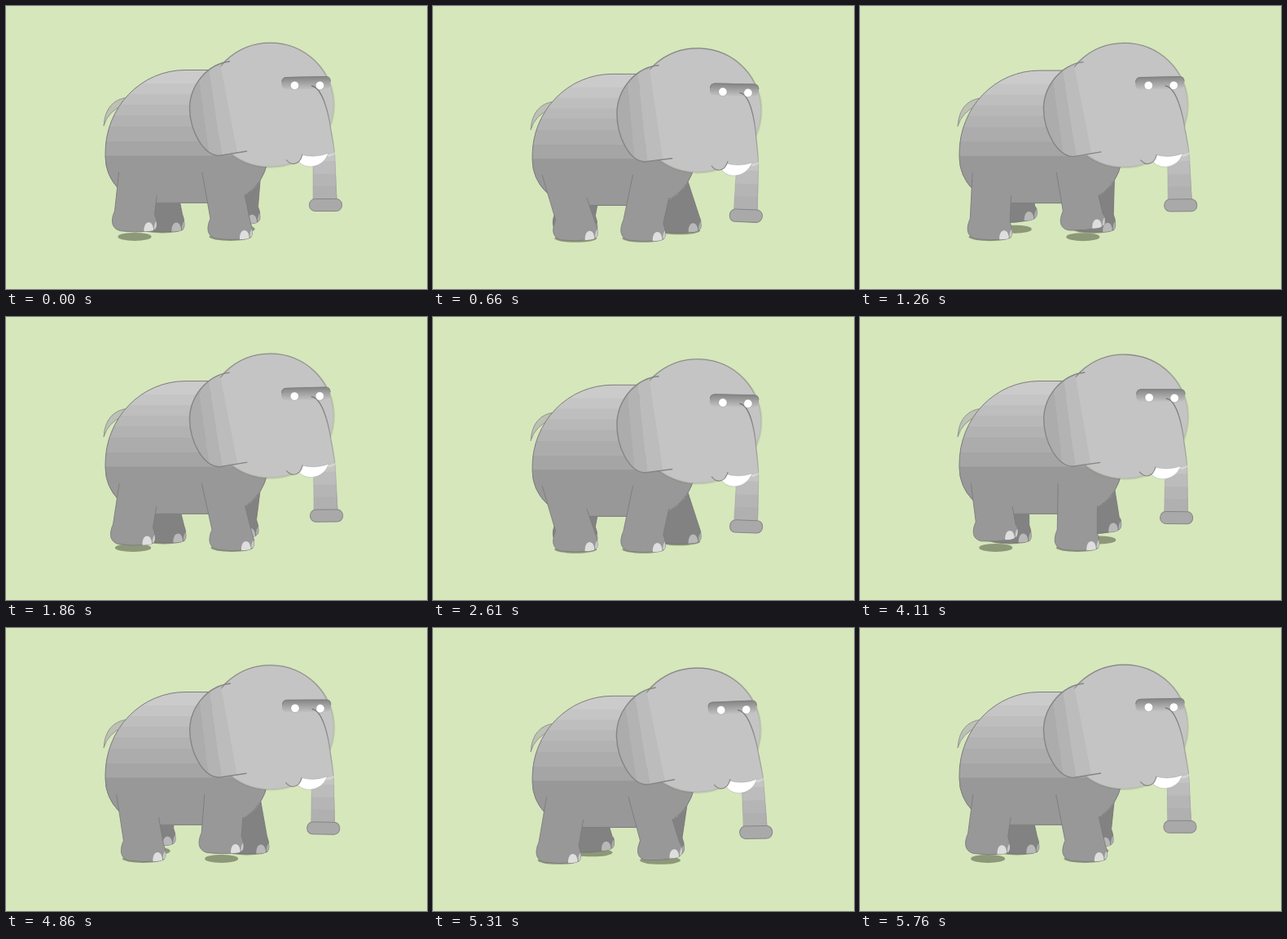
Recreate the animation shown at these times as an HTML page with a canvas. Size 517x347 px, loop 5910 ms.

```html
<!DOCTYPE html>
<html lang="en">
<head>
<meta charset="utf-8">
<title>Walking elephant</title>
<style>
  html, body { margin: 0; width: 100%; height: 100%; overflow: hidden; background: #d6e7bc; }
  canvas { display: block; width: 517px; height: 347px; }
</style>
</head>
<body>
<canvas id="stage" width="517" height="347"></canvas>
<script>
const ctx = document.getElementById('stage').getContext('2d');
const LOOP = 5910, STRIDE = 1930, TAU = Math.PI * 2, DEG = Math.PI / 180;
const SKIN = '#c4c4c4', HIDE = '#989898', FAR = '#828282', LINE = '#7c7c7c';

const gray = v => `rgb(${v},${v},${v})`;
const smooth = x => { x = Math.min(1, Math.max(0, x)); return x * x * (3 - 2 * x); };
const wave = u => Math.cos(TAU * u);
// 1 at whole turns, -1 half way between, straight in between
const triangle = u => 1 - 4 * Math.abs(u - Math.round(u));

function paint(path, fill, stroke, width = 1) {
  if (fill) { ctx.fillStyle = fill; ctx.fill(path); }
  if (stroke) { ctx.strokeStyle = stroke; ctx.lineWidth = width; ctx.stroke(path); }
}

function ellipse(x, y, rx, ry, fill, stroke, width) {
  const p = new Path2D();
  p.ellipse(x, y, rx, ry, 0, 0, TAU);
  paint(p, fill, stroke, width);
}

function clipped(path, draw) {
  ctx.save();
  ctx.clip(path);
  draw();
  ctx.restore();
}

function group(x, y, { turn = 0, lean = 0, stretch = 1 }, draw) {
  ctx.save();
  ctx.translate(x, y);
  ctx.rotate(turn * DEG);
  ctx.transform(1, 0, -Math.tan(lean * DEG), stretch, 0, 0);
  ctx.translate(-x, -y);
  draw();
  ctx.restore();
}

function poseAt(time) {
  const u = time / STRIDE;
  return {
    u,
    nod: triangle(u - 0.305) - triangle(-0.305),
    bob: 4.9 * smooth((wave(2 * (u - 0.3)) + 0.6) / 1.5)
  };
}

// rest: left side of the foot when the leg hangs straight; u: place in its own stride
function makeLeg(rest, u, far, bob) {
  const swing = wave(u - 0.34) * 11.2;
  const speed = -Math.sin(TAU * (u - 0.34));
  return {
    rest, far, swing,
    left: rest + swing,
    lift: smooth((speed - 0.4) / 0.48),
    tilt: 5.5 * Math.max(0, wave(u - 0.2)) ** 3,
    ground: (far ? 277.2 : 286.7) + bob * 0.4
  };
}

function drawShadow(leg) {
  ellipse(leg.left + 27.5, leg.ground - 3.8, 26 - leg.lift * 5.5, 5, 'rgba(70,75,55,.5)');
}

function toe(x, y, w, fill) {
  const p = new Path2D();
  p.moveTo(x, y);
  p.bezierCurveTo(x - 1, y - 15, x + w + 1, y - 15, x + w, y);
  paint(p, fill);
}

function drawLeg(leg, bob) {
  const { left: l, rest, swing, far } = leg;
  const bottom = leg.ground - leg.lift * 9.6;
  const sole = x => bottom - leg.tilt * x / 54;
  const top = 204 + bob * 0.6;
  const p = new Path2D();
  p.moveTo(rest + 0.5 - swing * 0.27, top);
  p.lineTo(l + 3, bottom - 26);
  p.bezierCurveTo(l - 1, bottom - 17, l - 3, bottom - 5, l + 10, sole(10) - 1.5);
  p.quadraticCurveTo(l + 27, sole(27) + 1, l + 46, sole(46) - 1);
  p.quadraticCurveTo(l + 55, sole(55) - 2, l + 54.5, sole(55) - 9);
  p.quadraticCurveTo(l + 54.5, sole(55) - 16, l + 52, bottom - 22);
  if (far) p.lineTo(rest + 48.5 - swing * 0.15, top);
  else p.lineTo(rest + 50 + swing * 0.2, 232 + bob * 0.6);
  paint(p, far ? FAR : HIDE, far ? '#777' : LINE, 0.9);
  clipped(p, () => {
    toe(l + 39, sole(45) - 0.5, 11.5, far ? '#b8b8b8' : '#dedede');
    toe(l + 51.5, sole(55) - 3, 10, far ? '#acacac' : '#cbcbcb');
  });
}

function drawTail() {
  paint(new Path2D('M150 112Q122 115 120 147Q125 129 145 121'), '#bcc1b4', '#92958d', 1);
}

function drawBody() {
  const p = new Path2D();
  p.ellipse(220, 180, 98, 101.5, 0, Math.PI, Math.PI * 1.5);
  p.lineTo(262, 78.5);
  p.ellipse(262, 180, 60, 101.5, 0, -Math.PI / 2, 0);
  p.ellipse(262, 180, 60, 61.3, 0, 0, Math.PI / 2);
  p.ellipse(180, 185, 58, 56.3, 0, Math.PI / 2, Math.PI);
  p.closePath();
  clipped(p, () => {
    [78, 95, 108, 121, 134, 148, 166, 183.5].forEach((y, i) => {
      ctx.fillStyle = i < 7 ? gray(Math.round(203 - i * 6.3)) : HIDE;
      ctx.fillRect(115, y, 215, 180);
    });
  });
  paint(p, null, LINE, 1);
}

function drawSkull() {
  ellipse(324.5, 121.5, 78, 76, SKIN, 'rgba(110,120,90,.2)', 3);
  const edge = ctx.createLinearGradient(340, 45, 395, 125);
  edge.addColorStop(0, '#858585');
  edge.addColorStop(0.6, '#999');
  edge.addColorStop(1, 'rgba(175,180,168,.3)');
  ellipse(324.5, 121, 77.7, 75.8, SKIN, edge, 1.1);
}

function drawEar() {
  const outline = 'M275 68C247 71 226 97 225.5 125C226 153 242 183 262 183.5L296 178';
  const p = new Path2D(outline + 'Z');
  const edges = [[205, 205], [236, 249], [249, 265], [263, 285]];
  clipped(p, () => {
    [172, 179, 188].forEach((tone, i) => {
      const [a, b] = edges[i], [c, d] = edges[i + 1];
      paint(new Path2D(`M${a - 2} 60L${b + 2} 195H${d + 2}L${c - 2} 60Z`), gray(tone));
    });
  });
  paint(new Path2D(outline), null, '#858585', 1.4);
}

function drawTrunk() {
  const p = new Path2D('M375 98C388 99 396 130 399 152Q403 172 404 185L406.5 240H377.5L377 190L355 186Q358 140 375 98Z');
  clipped(p, () => {
    [95, 190, 206, 221].forEach((y, i) => {
      ctx.fillStyle = gray([196, 188, 181, 176][i]);
      ctx.fillRect(350, y, 70, 160);
    });
  });
  paint(new Path2D('M399 152Q403 172 404 185L406 237M377 197V237'), null, 'rgba(145,145,145,.45)', 0.8);
  const tip = new Path2D();
  tip.roundRect(372.5, 236.5, 40, 15, 7);
  paint(tip, '#a9a9a9', '#858585', 1);
  paint(new Path2D('M394 182Q402 182 407 177Q405 183 396 185Z'), 'rgba(230,236,222,.5)');
  paint(new Path2D('M357 188Q363 197 374 197Q390 196 396 180.5Q379 187 362 182Z'), '#fff', 'rgba(120,120,120,.4)', 0.7);
}

function drawTrunkLine() {
  const fade = ctx.createLinearGradient(0, 98, 0, 180);
  fade.addColorStop(0, '#737373');
  fade.addColorStop(0.4, '#8c8c8c');
  fade.addColorStop(1, 'rgba(150,150,150,.3)');
  paint(new Path2D('M375 98C388 99 396 130 399 152Q402 168 403.5 180'), null, fade, 1.3);
}

function drawMouth() {
  paint(new Path2D('M344 188Q352 197 360 190Q363 187 364 182L352 176Z'), SKIN);
  paint(new Path2D('M344 188.5Q352 197.5 360 190.5Q363 187 364 182'), null, '#858585', 1.1);
}

function drawBrow() {
  group(368, 95, { turn: -1 }, () => {
    const shade = ctx.createLinearGradient(0, 87, 0, 103);
    shade.addColorStop(0, '#858585');
    shade.addColorStop(0.5, '#a5a5a5');
    shade.addColorStop(1, SKIN);
    const p = new Path2D();
    p.roundRect(338.5, 86.7, 60, 15.5, 6);
    paint(p, shade);
    paint(new Path2D('M339 93Q339 87 345 87H393Q398 87 398.5 93'), null, '#808080', 1);
  });
}

function drawEyes() {
  for (const x of [354.5, 385.5]) ellipse(x, 97.4, 5.2, 5.2, '#fff', 'rgba(140,140,140,.55)', 0.8);
}

function drawHead({ nod, bob }) {
  const stretch = 1 + bob * 0.006;
  const trunk = draw => group(380, 105, { lean: nod * 1.4, stretch }, draw);
  group(280, 135, { turn: nod * 2.1 }, () => {
    drawSkull();
    group(275, 68, { stretch }, drawEar);
    trunk(drawTrunk);
    drawMouth();
    drawBrow();
    trunk(drawTrunkLine);
    drawEyes();
  });
}

function draw(time) {
  const pose = poseAt(time);
  const { u, bob } = pose;
  const farLegs = [makeLeg(158.5, u + 0.5, true, bob), makeLeg(263.5, u, true, bob)];
  const nearLegs = [makeLeg(136.5, u, false, bob), makeLeg(242, u + 0.5, false, bob)];
  const bobbing = part => {
    ctx.save();
    ctx.translate(0, bob);
    part();
    ctx.restore();
  };

  ctx.fillStyle = '#d6e7bc';
  ctx.fillRect(0, 0, 517, 347);
  bobbing(drawTail);
  [...farLegs, ...nearLegs].forEach(drawShadow);
  farLegs.forEach(leg => drawLeg(leg, bob));
  bobbing(() => group(220, 78.5, { stretch: 1 - bob * 0.0022 }, drawBody));
  nearLegs.forEach(leg => drawLeg(leg, bob));
  bobbing(() => drawHead(pose));
}

// The walk advances in held steps: three short ones, then an even beat.
function heldTime(t) {
  return t < 360 ? Math.floor(t / 120) * 120 : 360 + Math.floor((t - 360) / 150) * 150;
}

function tick() {
  draw(heldTime(performance.now() % LOOP));
  requestAnimationFrame(tick);
}
tick();
</script>
</body>
</html>
```
